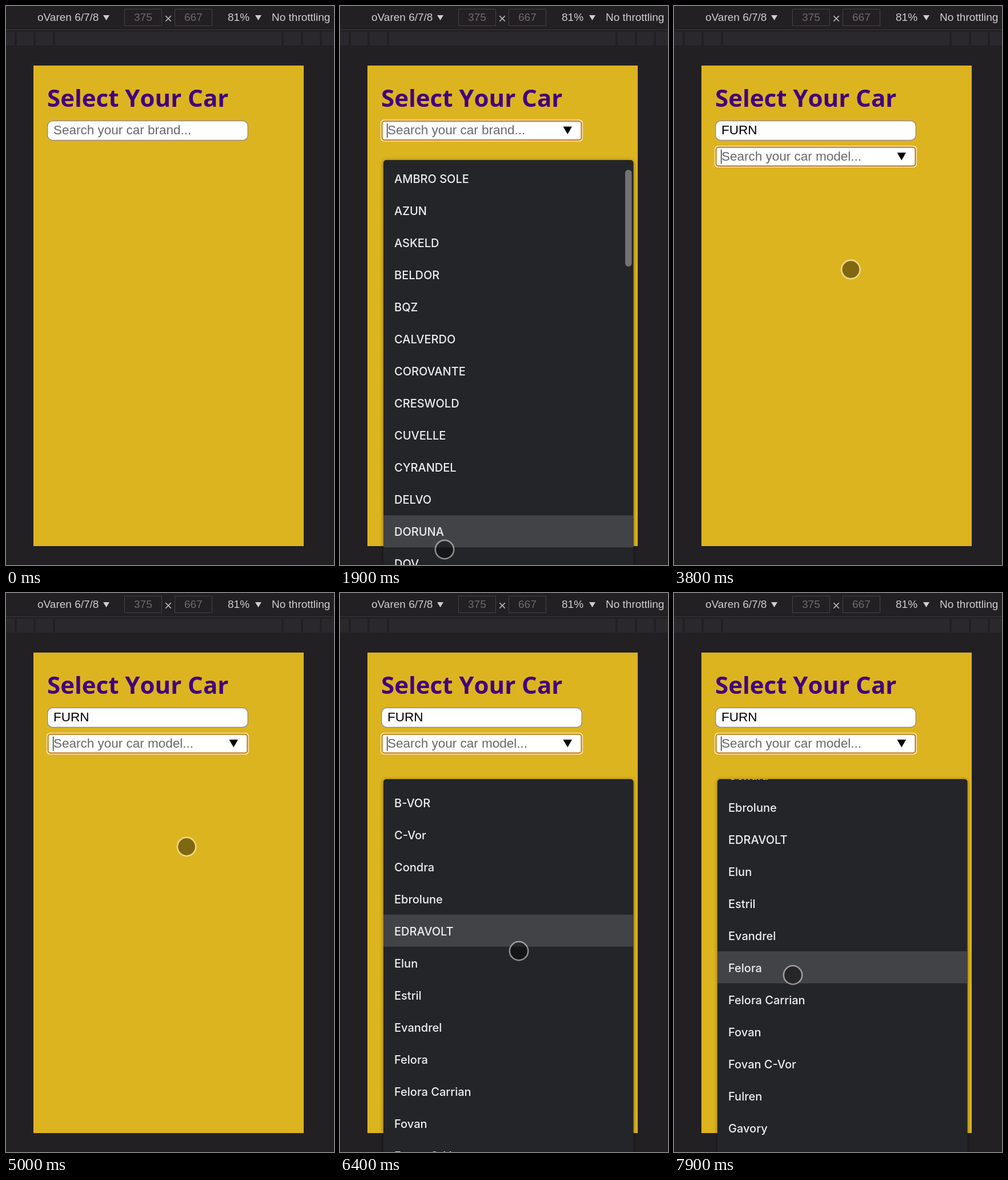
An HTML page with a canvas for the animation above (8000 ms loop, 574 by 976 pixels).

```html
<!DOCTYPE html>
<html lang="en">
<head>
<meta charset="utf-8">
<title>Select Your Car</title>
<style>
html, body { margin: 0; width: 100%; height: 100%; overflow: hidden; background: #232024; }
canvas { display: block; }
</style>
</head>
<body>
<canvas id="stage" width="574" height="976"></canvas>
<script>
const ctx = document.getElementById('stage').getContext('2d');
const LOOP = 8000, ROW = 56;
const SANS = '"Liberation Sans", Arial, sans-serif';
const BRANDS = ['AMBRO SOLE', 'AZUN', 'ASKELD', 'BELDOR', 'BQZ', 'CALVERDO', 'COROVANTE', 'CRESWOLD',
  'CUVELLE', 'CYRANDEL', 'DELVO', 'DORUNA', 'DQV', 'DUMAKARI', 'DRENK', 'FELO', 'FURN'];
const MODELS = ['B-VOR', 'C-Vor', 'Condra', 'Ebrolune', 'EDRAVOLT', 'Elun', 'Estril', 'Evandrel',
  'Felora', 'Felora Carrian', 'Fovan', 'Fovan C-Vor', 'Fulren', 'Gavory'];

// Key times in ms
const PRESS = 900, OPEN = 960, PICK = 3400, OPEN_MODELS = 5780;

// Pointer path: time, x, y
const PATH = [[100, 496, 300], [700, 386, 222], [1150, 386, 222], [1850, 183, 949], [2800, 183, 949],
  [3050, 162, 945], [3350, 162, 945], [3600, 290, 510], [3900, 316, 443], [5100, 316, 443],
  [5550, 392, 266], [5850, 392, 266], [6350, 313, 625], [6700, 313, 625], [7300, 208, 667], [8000, 208, 667]];
const BRAND_SCROLL = [[1800, 0], [2780, 277]];
const MODEL_SCROLL = [[6500, 0], [7350, 160]];

function along(keys, t) {
  if (t <= keys[0][0]) return keys[0].slice(1);
  const i = keys.findIndex(k => k[0] > t);
  if (i < 0) return keys[keys.length - 1].slice(1);
  const a = keys[i - 1], b = keys[i], u = (t - a[0]) / (b[0] - a[0]);
  const s = u * u * (3 - 2 * u);
  return a.slice(1).map((v, j) => v + (b[j + 1] - v) * s);
}

function box(x, y, w, h, r, fill, stroke, width = 1) {
  ctx.beginPath();
  ctx.roundRect(x, y, w, h, r);
  if (fill) { ctx.fillStyle = fill; ctx.fill(); }
  if (stroke) { ctx.strokeStyle = stroke; ctx.lineWidth = width; ctx.stroke(); }
}

function poly(points, fill, stroke) {
  ctx.beginPath();
  points.forEach(p => ctx.lineTo(...p));
  ctx.closePath();
  ctx.fillStyle = fill;
  ctx.fill();
  if (stroke) { ctx.strokeStyle = stroke; ctx.lineWidth = 2; ctx.stroke(); }
}

function text(str, x, y, font, color) {
  ctx.font = font;
  ctx.fillStyle = color;
  ctx.fillText(str, x, y);
}

const triangle = (x, y, w, h, color) => poly([[x, y], [x + w, y], [x + w / 2, y + h]], color);

function drawToolbar() {
  const font = '19px ' + SANS;
  box(0, 0, 574, 976, 0, '#232024');
  text('oVaren 6/7/8', 55, 26, font, '#cfcdd0');
  triangle(170, 16, 11, 9, '#cfcdd0');
  box(207.5, 5.5, 65, 29, 0, null, '#434145');
  box(295.5, 5.5, 65, 29, 0, null, '#434145');
  text('375', 224, 26, font, '#6c6a6d');
  text('667', 312, 26, font, '#6c6a6d');
  text('×', 277, 30, '24px ' + SANS, '#b5b3b6');
  text('81%', 388, 26, font, '#cfcdd0');
  triangle(436, 16, 11, 9, '#cfcdd0');
  text('No throttling', 465, 26, font, '#cfcdd0');
  box(0, 41, 574, 1, 0, '#39373a');
  [[0, 15], [19, 48], [52, 82], [86, 482], [486, 516], [520, 549], [553, 574]]
    .forEach(([a, b]) => box(a, 45, b - a, 24, 0, '#2a282c'));
}

function drawField(y, str, active, filled) {
  if (active) {
    box(71, y - 1.5, 354, 38, 6, '#fff3d6');
    box(73.5, y + 1, 349, 33, 4.5, '#fff', '#cb852b', 2.5);
    triangle(390.5, y + 10.5, 15.5, 13.5, '#000');
    box(82, y + 5, 1.3, 25, 0, '#222');
  } else {
    box(72.7, y + .5, 350.6, 34, 9, '#fff', '#98888a', 1.4);
  }
  text(str, 83, y + 24, '22.5px ' + SANS, filled ? '#000' : '#69676b');
}

function drawList(items, top, scroll, hoverY, bar) {
  ctx.save();
  ctx.shadowColor = 'rgba(0,0,0,.45)';
  ctx.shadowBlur = 6;
  ctx.shadowOffsetY = 1;
  box(76, top, 437.5, 760, 5, '#242529');
  ctx.restore();
  ctx.save();
  ctx.beginPath();
  ctx.roundRect(76, top, 437.5, 760, 5);
  ctx.clip();
  const first = top + 12.5 - scroll;
  const hover = Math.floor((hoverY - first) / ROW);
  items.forEach((name, i) => {
    const y = first + i * ROW;
    if (i === hover && hoverY > top) box(76, y, 438, ROW, 0, '#424346');
    text(name, 95, y + 36, '500 20px Inter, sans-serif', '#eeeef0');
  });
  ctx.globalAlpha = bar.alpha;
  box(499, top + 15 + bar.rate * scroll, 11.5, bar.size, 5.75, '#737376');
  ctx.restore();
}

// The scroll bar shows while scrolling and fades out soon after
function barAlpha(keys, t) {
  const begin = keys[0][0], end = keys[1][0];
  return t < begin ? 0 : Math.max(0, Math.min(1, (end + 250 - t) / 150));
}

function drawPointer(t) {
  if (t < 100) return;
  const [x, y] = along(PATH, t);
  if (t >= 2900 && t < PICK) {
    const shape = [[0, 0], [0, 23], [5, 18.5], [9, 27], [13, 25], [9.5, 17], [16, 17]];
    poly(shape.map(p => [x + p[0], y - 13 + p[1]]), '#000', '#fff');
    return;
  }
  const pressed = (t >= PRESS && t < 1120) || (t >= 5650 && t < 5830);
  ctx.beginPath();
  ctx.arc(x, y, 15, 0, 7);
  ctx.fillStyle = pressed ? 'rgba(138,134,139,.94)' : 'rgba(0,0,0,.42)';
  ctx.fill();
  ctx.beginPath();
  ctx.arc(x, y, 16.2, 0, 7);
  ctx.strokeStyle = 'rgba(255,255,255,.48)';
  ctx.lineWidth = 2.6;
  ctx.stroke();
}

function draw(t) {
  const picked = t >= PICK;
  const hoverY = along(PATH, t)[1] - 12;
  drawToolbar();
  box(48, 104, 473, 839, 0, '#dcb41f');
  ctx.fontKerning = 'none';
  text('Select Your Car', 72, 176, '700 42px "Open Sans", "Noto Sans", sans-serif', '#42007f');
  ctx.fontKerning = 'auto';
  drawField(200, picked ? 'FURN' : 'Search your car brand...', t >= PRESS && !picked, picked);
  if (picked) drawField(245.5, 'Search your car model...', true, false);
  if (t >= OPEN && !picked) {
    drawList(BRANDS, 269, along(BRAND_SCROLL, t)[0], hoverY,
      { alpha: barAlpha(BRAND_SCROLL, t), rate: .235, size: 169 });
  }
  if (t >= OPEN_MODELS) {
    drawList(MODELS, 325, along(MODEL_SCROLL, t)[0], hoverY,
      { alpha: barAlpha(MODEL_SCROLL, t), rate: .3, size: 200 });
  }
  drawPointer(t);
}

const start = performance.now();
function tick() {
  draw((performance.now() - start) % LOOP);
  requestAnimationFrame(tick);
}
tick();
</script>
</body>
</html>
```
